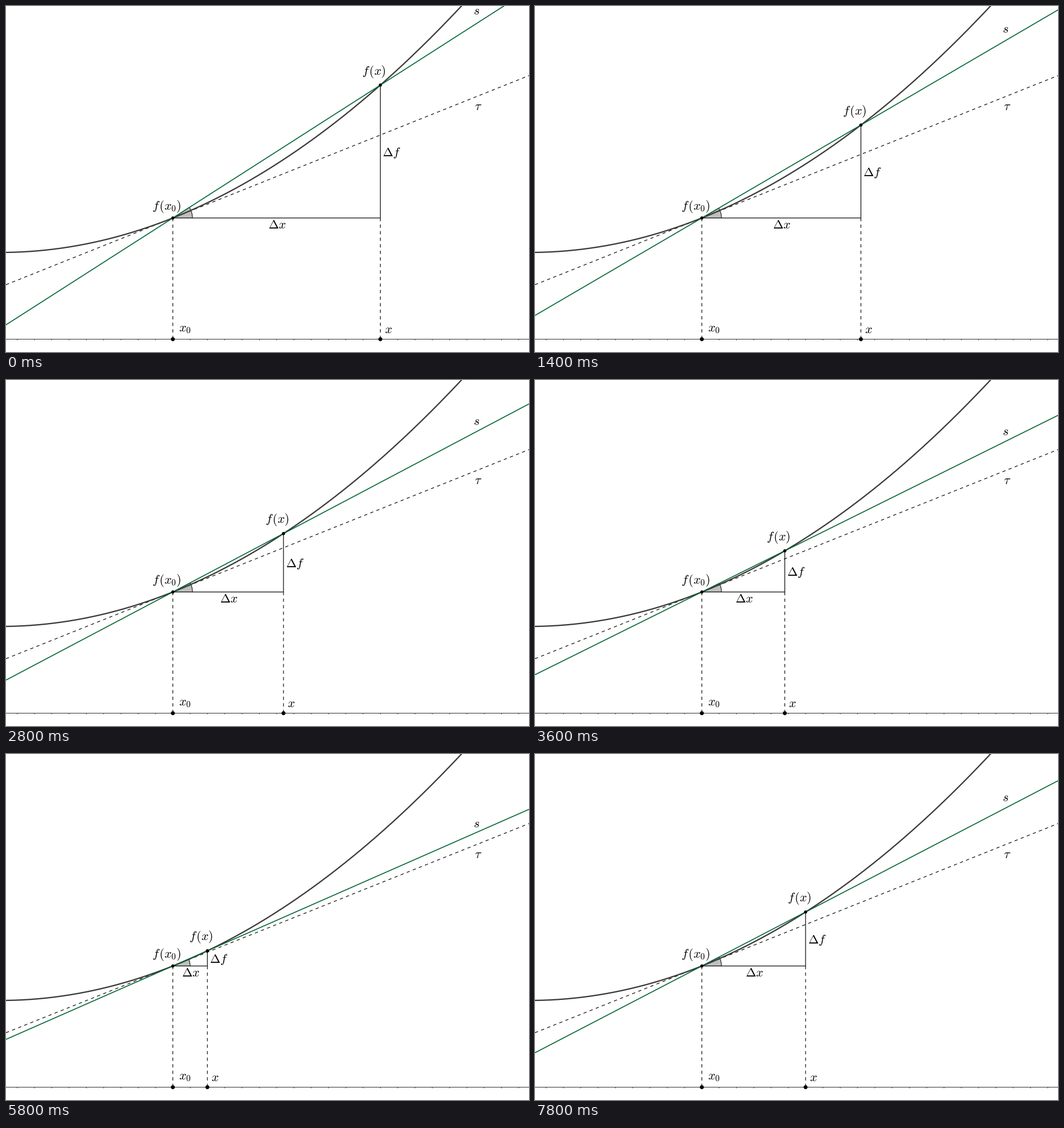
These frames come from a looping animation (920x608 px, 8 s). A matplotlib script:

```python
import numpy as np
import matplotlib.pyplot as plt
from matplotlib.animation import FuncAnimation
from matplotlib.patches import Circle, Wedge

W, H, DPI = 920, 608, 64
FRAMES, INTERVAL = 40, 200
PT = 72 / DPI                      # points per pixel

X0, X_START, STEP = 293.5, 658.5, 12.17
TURN = 27                          # steps until x moves back again
AXIS_Y = 585.5
A, B, C = 6.5846e-4, 0.01287, 433.0
DASH = 5.75
GREEN, DARK = "#006633", "#3c3a3c"
FX = r"f\hspace{0.1}"              # room for the slanted top of the f

plt.rcParams["mathtext.fontset"] = "cm"
plt.rcParams["lines.scale_dashes"] = False


def f(x):
    return C - B * x - A * x * x


Y0 = f(X0)

fig = plt.figure(figsize=(W / DPI, H / DPI), dpi=DPI, facecolor="white")
ax = fig.add_axes([0, 0, 1, 1])
ax.set_xlim(0, W)
ax.set_ylim(H, 0)
ax.axis("off")


def line(xs=(), ys=(), width=1.15, color="black", z=2, dashed=False):
    art, = ax.plot(xs, ys, color=color, lw=width * PT, zorder=z, snap=False,
                   solid_capstyle="butt", solid_joinstyle="miter")
    if dashed:
        art.set_linestyle((0, (DASH * PT, DASH * PT)))
    return art


def label(text, x=0, y=0, ha="left"):
    return ax.text(x, y, f"${text}$", fontsize=22 * PT, ha=ha,
                   va="baseline", color="black", zorder=8)


def dot(x, y, r):
    return ax.add_patch(Circle((x, y), r, fc="black", ec="none", zorder=7))


def through_start(slope):
    return [Y0 + slope * X0, Y0 - slope * (W - X0)]


# Fixed parts
line([0, W], [AXIS_Y, AXIS_Y], 1.0, "#303030")
for k in range(-9, 21):
    tx = X0 + k * 2.5 * STEP
    line([tx, tx], [AXIS_Y, AXIS_Y + 2], 1.0, "#303030")

xs = np.linspace(0, W, 400)
line(xs, f(xs), 2.3, DARK, z=4)
line([0, W], through_start(B + 2 * A * X0), dashed=True, z=3)
line([X0, X0], [Y0, AXIS_Y], dashed=True)
dot(X0, Y0, 2.8)
dot(X0, AXIS_Y, 3.5)
label(FX + "(x_0)", 257, 357.5)
label("x_0", 304, 572)
label(r"\tau", 824.5, 183)

# Moving parts
secant = line(width=1.65, color=GREEN, z=5)
legs = line(width=1.2, z=4)
drop = line(dashed=True)
angle = ax.add_patch(Wedge((X0, Y0), 30, 0, 1, fc=(0, 0, 0, 0.25),
                           ec="black", lw=PT, zorder=1, snap=False))
curve_dot = dot(0, 0, 2.8)
axis_dot = dot(0, 0, 3.5)
s_label = label("s", 822.5)
fx_label = label(FX + "(x)", ha="center")
x_label = label("x")
dx_label = label(r"\Delta x", ha="center")
df_label = label(r"\Delta f")


def draw(i):
    n = TURN - abs(TURN - i)
    x = X_START - STEP * n
    y = f(x)
    slope = (Y0 - y) / (x - X0)

    secant.set_data([0, W], through_start(slope))
    legs.set_data([X0, x, x], [Y0, Y0, y])
    drop.set_data([x, x], [Y0, AXIS_Y])
    angle.set_radius(min(34.5, (x - X0) / 2))
    angle.set_theta1(-np.degrees(np.arctan(slope)))
    angle.set_theta2(0)
    curve_dot.center = x, y
    axis_dot.center = x, AXIS_Y

    s_label.set_y(15 + 4.565 * n)
    fx_label.set_position((x - 11, y - 18.5))
    x_label.set_position((x + 7, 575))
    dx_label.set_position(((X0 + x) / 2 + 1, 391))
    df_label.set_position((x + 4, (Y0 + y) / 2 + 8))
    return []


anim = FuncAnimation(fig, draw, frames=FRAMES, interval=INTERVAL,
                     repeat=True, repeat_delay=0)
plt.show()
```
